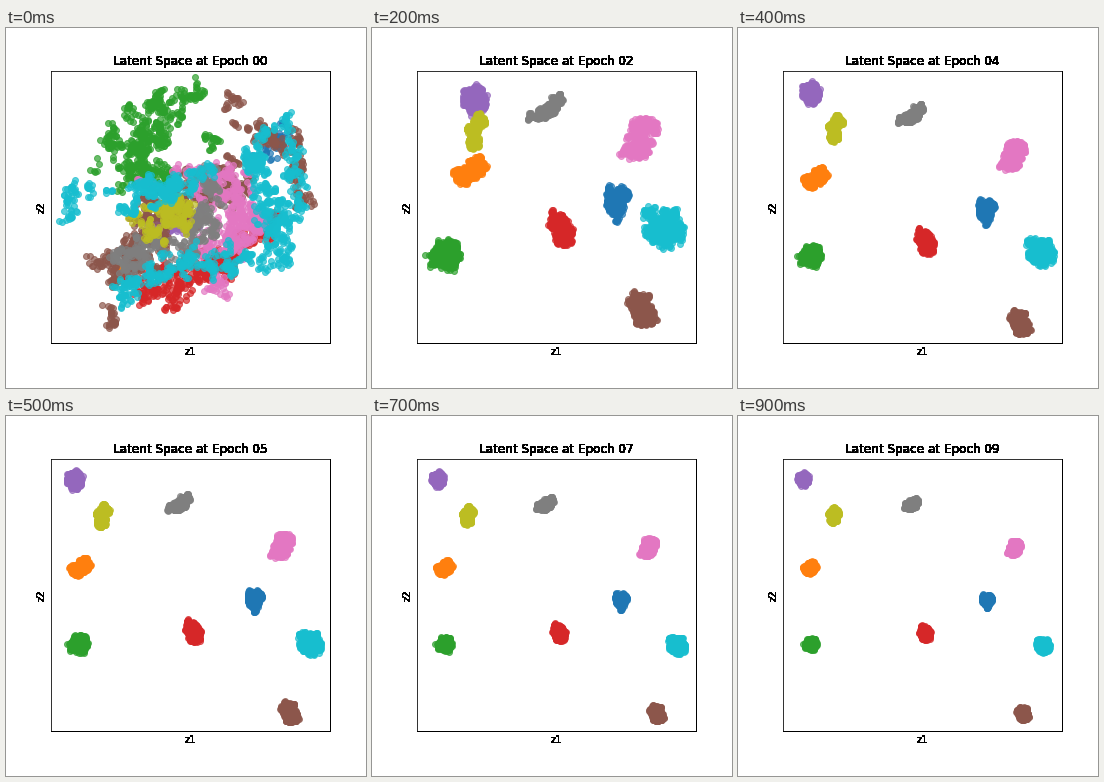
A matplotlib script that plays this animation: 360 px wide and 360 px high, repeating every 1000 ms.

```python
import numpy as np
import matplotlib.pyplot as plt
from matplotlib.animation import FuncAnimation

SIZE, DPI = 360, 72
EPOCHS, INTERVAL = 10, 100
CLUMPS, CLUMP_DOTS = 55, 8
DOT_RADIUS = 3.4
FINAL_RADIUS = 7.5
TEXT_COPIES = 50

plt.rcParams["font.family"] = "DejaVu Sans"
fig = plt.figure(figsize=(SIZE / DPI, SIZE / DPI), dpi=DPI, facecolor="white")
ax = fig.add_axes([0.125, 0.125, 0.775, 0.755])
ax.set(xlim=(45, 324), ylim=(315, 43.2), xticks=[], yticks=[])
for side in ("right", "bottom"):
    ax.spines[side].set_linewidth(1)


def hard_text(text, anchor, shift, **style):
    """Overprint text until its soft edge pixels turn fully black."""
    return [ax.annotate(text, anchor, shift, "axes fraction", textcoords="offset points",
                        ha="center", **style) for _ in range(TEXT_COPIES)]


titles = hard_text("", (0.5, 1), (0, 6), va="baseline", fontsize=12)
hard_text("z1", (0.5, 0), (0, -4), va="top", fontsize=10)
hard_text("z2", (0, 0.5), (-4, 0), va="bottom", fontsize=10, rotation=90, rotation_mode="anchor")


def along(path, t):
    """Points at fractions t of the length of a polyline."""
    path = np.array(path, float)
    lengths = np.hypot(*np.diff(path, axis=0).T)
    at = np.r_[0, np.cumsum(lengths)] / lengths.sum()
    return np.c_[np.interp(t, at, path[:, 0]), np.interp(t, at, path[:, 1])]


def disc(rng, count):
    """Random points in the unit disc."""
    angle = rng.uniform(0, 2 * np.pi, count)
    return np.sqrt(rng.random(count))[:, None] * np.c_[np.cos(angle), np.sin(angle)]


def random_walks(rng, spread, *path):
    """Short walks that start around a polyline, as many as its area needs."""
    length = np.hypot(*np.diff(path, axis=0).T).sum()
    count = int((2 * spread * length + np.pi * spread ** 2) / 75) + 2
    seeds = along(path, rng.random(count)) + spread * disc(rng, count)
    steps = rng.normal(0, 2.6, (6, count, 2))
    return (seeds + np.cumsum(steps, axis=0)).reshape(-1, 2)


class Cluster:
    """A cloud that snaps to a trail, then to a huddle that settles at home."""

    def __init__(self, color, cloud, trail, huddle, home):
        self.rng = np.random.default_rng(len(ax.collections) + 20)
        self.cloud = np.concatenate([random_walks(self.rng, *stroke) for stroke in cloud])
        self.trail, self.huddle, self.home = trail, huddle, np.array(home)
        dots = CLUMPS * CLUMP_DOTS
        t = np.repeat(self.rng.random(CLUMPS), CLUMP_DOTS)
        self.t = np.clip(t + self.rng.normal(0, 0.02, dots), 0, 1)
        self.offset = np.repeat(disc(self.rng, CLUMPS), CLUMP_DOTS, axis=0)
        self.offset += self.rng.normal(0, 0.12, (dots, 2))
        self.artist = ax.scatter([], [], s=36, color=color, alpha=0.7)

    def swell(self, path, radius):
        return along(path, self.t) + (radius - DOT_RADIUS) * self.offset

    def pose(self, epoch):
        if epoch == 0:
            return self.cloud
        if epoch == 1:
            return self.swell(self.trail[1:], self.trail[0])
        age = epoch - 2
        radius, path = self.huddle[0], np.array(self.huddle[1:], float)
        middle = path.mean(axis=0)
        center = self.home + (middle - self.home) * 0.45 ** age
        radius = FINAL_RADIUS + (radius - FINAL_RADIUS) * 0.75 ** age
        return self.swell(center + (path - middle) * 0.83 ** age, radius)


# Every stroke is a radius followed by the key points of its path.
clusters = [
    Cluster("tab:blue",
            cloud=[(8, (270, 105), (268, 130))],
            trail=(11, (257, 105), (259, 165), (271, 212)),
            huddle=(14, (247, 161), (243, 183)), home=(249, 184)),
    Cluster("tab:orange",
            cloud=[(5, (108, 250), (112, 246))],
            trail=(9, (99, 164), (104, 177), (131, 199), (152, 191)),
            huddle=(12, (108, 137), (88, 149)), home=(72, 152)),
    Cluster("tab:green",
            cloud=[(5, (203, 65), (165, 62), (130, 82), (93, 124)),
                   (16, (165, 78), (145, 108), (112, 130)),
                   (4, (200, 111), (213, 115)), (14, (120, 145), (165, 145))],
            trail=(10, (115, 104), (98, 103), (74, 145), (69, 175), (90, 204)),
            huddle=(17, (78, 223), (70, 231)), home=(73, 228)),
    Cluster("tab:red",
            cloud=[(7, (178, 252), (171, 278)), (15, (130, 258), (215, 238), (260, 190))],
            trail=(14, (222, 225), (217, 239)),
            huddle=(12, (184, 189), (194, 213)), home=(187, 217)),
    Cluster("tab:purple",
            cloud=[(12, (150, 190), (190, 200))],
            trail=(9, (139, 105), (131, 123)),
            huddle=(14, (101, 66), (104, 78)), home=(65, 63)),
    Cluster("tab:brown",
            cloud=[(4, (220, 70), (238, 78)), (8, (237, 102), (284, 108), (294, 155), (306, 180)),
                   (3, (84, 300), (104, 296), (108, 284)),
                   (22, (103, 242), (130, 238), (160, 170), (240, 150))],
            trail=(12, (284, 258), (297, 274), (299, 293)),
            huddle=(14, (266, 269), (274, 290)), home=(285, 297)),
    Cluster("tab:pink",
            cloud=[(19, (185, 150), (220, 150), (242, 195), (205, 220)),
                   (4, (207, 235), (210, 268)), (3, (139, 158), (142, 162))],
            trail=(11, (252, 63), (276, 66), (272, 95), (265, 140)),
            huddle=(17, (272, 101), (262, 121)), home=(276, 132)),
    Cluster("tab:gray",
            cloud=[(13, (201, 150), (199, 205), (150, 220), (108, 238))],
            trail=(10, (208, 104), (204, 127), (187, 123)),
            huddle=(9, (187, 69), (180, 81), (160, 90)), home=(174, 88)),
    Cluster("tab:olive",
            cloud=[(22, (146, 198), (170, 186))],
            trail=(9, (145, 133), (129, 142), (127, 157)),
            huddle=(9, (111, 88), (100, 103), (102, 117)), home=(96, 99)),
    Cluster("tab:cyan",
            cloud=[(4, (60, 190), (68, 157), (118, 163)), (12, (108, 190), (148, 156), (205, 152)),
                   (14, (245, 108), (255, 150), (275, 200), (268, 232)),
                   (6, (276, 92), (287, 130), (288, 200)),
                   (11, (107, 266), (160, 237), (250, 232))],
            trail=(22, (291, 114), (286, 164)),
            huddle=(21, (286, 194), (296, 200)), home=(305, 229)),
]


def draw(epoch):
    for title in titles:
        title.set_text(f"Latent Space at Epoch {epoch:02d}")
    for cluster in clusters:
        cluster.artist.set_offsets(cluster.pose(epoch))
    return [cluster.artist for cluster in clusters] + titles


anim = FuncAnimation(fig, draw, frames=EPOCHS, interval=INTERVAL, repeat=True, repeat_delay=0)
plt.show()
```
